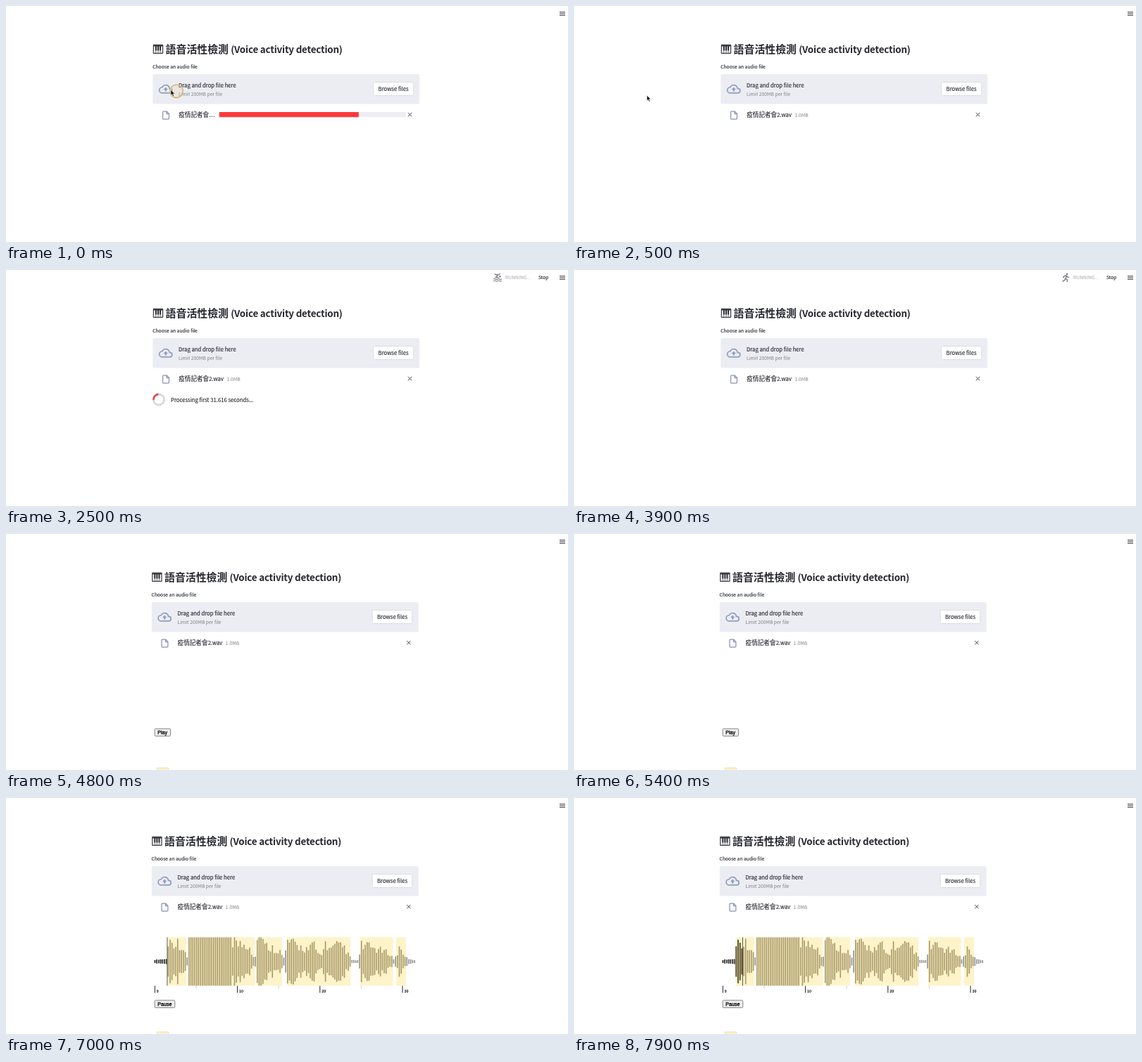
Write an HTML page that moves like this. It is 798 px wide and 336 px high and loops after 8000 ms.

```html
<!DOCTYPE html>
<html lang="zh-Hant">
<head>
<meta charset="utf-8">
<title>Voice activity detection</title>
<style>
  html, body { margin: 0; width: 100%; height: 100%; overflow: hidden; background: #fff; }
  svg { display: block; width: 100%; height: 100%; }
  text { font: 7.71px 'Noto Sans CJK TC', 'Noto Sans CJK SC', 'Noto Sans CJK JP', 'Noto Sans CJK', sans-serif; fill: #262730; stroke: #262730; stroke-width: .13; white-space: pre; }
  text.small { font-size: 6.75px; }
  text.dim { fill: #7f8089; stroke: none; }
  text.han { font-size: 8.6px; }
  text.title { font-size: 13.4px; font-weight: 700; letter-spacing: -.2px; stroke: none; }
  text.title.han { font-size: 14.9px; letter-spacing: 0; }
  text.button { font: 7.2px 'Liberation Sans', Arial, sans-serif; fill: #000; stroke: #000; stroke-width: .28; }
  text.tick { font: bold 5.4px 'Liberation Sans', Arial, sans-serif; fill: #111; stroke: none; }
  .line { fill: none; stroke-linecap: round; stroke-linejoin: round; }
</style>
</head>
<body>
<svg viewBox="0 0 798 336">
  <defs>
    <clipPath id="playedClip"><rect id="played" x="205" y="190" width="0" height="85"/></clipPath>
  </defs>

  <path d="M786 8.7h8M786 11h8M786 13.3h8" stroke="#3c3d46" stroke-width="1"/>

  <g id="status">
    <g id="figure" class="line" stroke="#80828a" stroke-width="1.5"></g>
    <text class="small" x="709" y="13.3" style="fill:#a2a3ab;stroke:none">RUNNING...</text>
    <text class="small" x="756" y="13.3">Stop</text>
  </g>

  <g id="page">
    <rect x="208.8" y="54.8" width="14.4" height="13.2" rx="1" fill="#3b3c42"/>
    <path d="M210 57.5h2.6v9.3h-2.6zM213.2 57.5h2.5v9.3h-2.5zM216.3 57.5h2.5v9.3h-2.5zM219.4 57.5h2.6v9.3h-2.6z" fill="#f4f4f6"/>
    <path d="M212.9 57v6.6M216 57v6.6M219.1 57v6.6" stroke="#26272c" stroke-width="1.9"/>
    <text class="title han" x="226.6" y="67.4">語音活性檢測</text>
    <text class="title" x="319.2" y="67">(Voice activity detection)</text>
    <text class="small" x="208.2" y="88.5">Choose an audio file</text>

    <rect x="208.4" y="97" width="378.8" height="42.4" rx="2" fill="#ecedf3"/>
    <g transform="translate(217.1 108.5) scale(.81)" fill="#8e9dbe">
      <path fill-rule="evenodd" d="M19.4 10a7.5 7.5 0 0 0 -14 -2a6 6 0 0 0 .6 12h13a5 5 0 0 0 .4 -10zM19 18h-13a4 4 0 0 1 -.4 -8l1 -.1l.5 -.9a5.5 5.5 0 0 1 10.3 1.4l.3 1.5l1.5 .1a3 3 0 0 1 -.2 6z"/>
      <path d="M8 13h2.5v3h3v-3h2.5l-4 -4z"/>
    </g>
    <text x="245" y="115.5">Drag and drop file here</text>
    <text class="small dim" x="245.1" y="128.4">Limit 200MB per file</text>
    <rect x="521.8" y="108.5" width="56.6" height="19" rx="2" fill="#fff" stroke="#d6d7de" stroke-width=".8"/>
    <text x="528.6" y="120.7">Browse files</text>

    <path class="line" d="M223.7 150h4.4l3.4 3.4v6.6q0 1.1 -1.1 1.1h-6.7q-1.1 0 -1.1 -1.1v-8.9q0 -1.1 1.1 -1.1zM228 150.3v3.2h3.2" stroke="#8c90b8" stroke-width="1.25"/>
    <text class="han" x="245.2" y="158.2">疫情記者會</text>
    <path d="M570.7 152l5.4 5.4M576.1 152l-5.4 5.4" stroke="#31333f" stroke-width=".9"/>
    <g id="uploading">
      <text x="288.4" y="158" style="letter-spacing:.8px">...</text>
      <rect x="302.8" y="151" width="265.2" height="7.2" fill="#ededf3"/>
      <rect id="progress" x="302.8" y="151" height="7.2" fill="#fd393c"/>
    </g>
    <g id="uploaded">
      <text x="288.3" y="158">2.wav</text>
      <text class="small dim" x="313.4" y="158">1.0MB</text>
    </g>
    <g id="busy">
      <g class="line" stroke-width="2.7">
        <circle cx="217" cy="184.5" r="7.6" stroke="#d6d7da"/>
        <path id="arc" d="M211.63 179.13a7.6 7.6 0 0 1 10.74 0" stroke="#e5484e" stroke-linecap="butt"/>
      </g>
      <text x="234" y="187.7">Processing first 31.616 seconds...</text>
    </g>
  </g>

  <g id="player">
    <g id="wave">
      <g id="regions" fill="#fff3ca"></g>
      <g id="bars"></g>
      <g id="barsPlayed" clip-path="url(#playedClip)"></g>
      <path id="head" d="M0 198.3v69" stroke="#444" stroke-width=".9"/>
      <g id="ruler"></g>
    </g>
    <g id="button">
      <rect id="buttonBox" x="211.2" y="277.2" height="10.6" rx="1.5" fill="#efefef" stroke="#666" stroke-width=".8"/>
      <text id="buttonText" class="button" x="215.2" y="285.1"></text>
    </g>
    <rect x="214.4" y="333" width="16" height="8" fill="#fff3ca" stroke="#ddd3a6" stroke-width=".7"/>
  </g>

  <g id="pointer">
    <g id="ring">
      <circle r="9.2" fill="#e6c88c" fill-opacity=".2" stroke="#d8bb86" stroke-width="1.8"/>
    </g>
    <path id="cursor" d="M0 0v7.6l1.8 -1.6l1.3 2.9l1.3 -.6l-1.3 -2.8h2.5z" fill="#111" stroke="#fff" stroke-width=".5"/>
  </g>
</svg>
<script>
const LOOP = 8000, STEP = 100;
const START = 211.5, PITCH = 2.69, MID = 232.8, PX_PER_SEC = 11.72;
const $ = id => document.getElementById(id);
const show = (id, on) => $(id).setAttribute('display', on ? 'inline' : 'none');
const move = (id, x, y) => $(id).setAttribute('transform', `translate(${x} ${y})`);
const clamp = v => Math.max(0, Math.min(1, v));

const speech = [[229.6, 255.8], [259, 353.2], [356.4, 392], [398.6, 489.2], [503, 549.6], [553.8, 568]];
// Loudness envelope: x, half height
const envelope = [
  [211, 2.5], [228, 3.5], [230, 37], [244, 35], [248, 30], [252, 22], [256, 9],
  [258, 4], [260, 42], [324, 42], [327, 33], [347, 30], [350, 8], [353, 13], [355, 7], [357, 42],
  [363, 40], [367, 30], [390, 20], [393, 4], [396, 7], [399, 38], [415, 28], [431, 22], [436, 34],
  [441, 18], [448, 10], [451, 34], [462, 22], [468, 30], [481, 26], [488, 8], [491, 2], [501, 2],
  [504, 30], [520, 26], [545, 15], [549, 4], [552, 3], [554, 12], [559, 26], [566, 12], [570, 4], [582, 1.5]
];

function loudness(x) {
  const i = Math.max(1, envelope.findIndex(p => p[0] >= x));
  const [x0, a] = envelope[i - 1], [x1, b] = envelope[i];
  return a + (b - a) * (x - x0) / (x1 - x0);
}

function buildWave() {
  $('regions').innerHTML = speech.map(([a, b]) =>
    `<rect x="${a}" y="198.3" width="${b - a}" height="69"/>`).join('');
  const bar = (x, h, color) =>
    `<rect x="${x - .8}" y="${MID - h}" width="1.6" height="${2 * h}" rx=".5" fill="${color}"/>`;
  let bars = '', played = '';
  for (let i = 0; i < 138; i++) {
    const x = START + i * PITCH, base = loudness(x);
    const noise = Math.abs(Math.sin(i * 12.9898) * 43758.5453) % 1;
    const gain = base > 40 ? (noise < .12 ? .48 : 1) : base < 8 ? .85 + .3 * noise : .5 + .52 * noise;
    const h = Math.min(34.5, base * gain);
    const voiced = speech.some(([a, b]) => x >= a && x <= b);
    bars += bar(x, h, voiced ? '#a59765' : '#8f8f92');
    played += bar(x, h, voiced ? '#4d4424' : '#333');
  }
  $('bars').innerHTML = bars;
  $('barsPlayed').innerHTML = played;

  let ruler = '';
  for (let s = 0; s <= 30; s += 5) {
    const x = 211.4 + s * PX_PER_SEC;
    ruler += s % 10
      ? `<path d="M${x} 267.4v4" stroke="#bbb" stroke-width=".8"/>`
      : `<path d="M${x} 267.4v10" stroke="#222" stroke-width="1"/><text class="tick" x="${x + 2.4}" y="277.3">${s}</text>`;
  }
  $('ruler').innerHTML = ruler;
}

const ball = (x, y, r = 1.3) => `<circle cx="${x}" cy="${y}" r="${r}" fill="#80828a" stroke="none"/>`;
const limbs = d => `<path d="${d}"/>`;
const figures = [
  // swimmer
  ball(701.4, 9.2) + limbs('M694 6l4.4 1l-3 3.4M698.4 7l3 -1.4M695 10.4l4 .2') +
    '<path stroke-width="1.1" d="M692.6 13q1.4 -1.2 2.8 0t2.8 0t2.8 0t2.6 0M692.6 15.6q1.4 -1.2 2.8 0t2.8 0t2.8 0t2.6 0"/>',
  // runner
  ball(700, 5.9) + limbs('M699.2 8l-1.4 4l2.6 1.6l-.2 3M697.8 12l-1.2 2.6l-2.6 1.4M694.8 10.8l1.2 -2.4l3.2 -.4l1.4 2l2 .2'),
  // jumper
  ball(698.4, 5.6) + limbs('M694 6.6l2.6 2.2h3.6l2.2 -2.6M698.4 9v3.4l-3 1.4v2.6M698.4 12.4l3 1.2l.6 2.8'),
  // rower
  ball(697.6, 6.8) + limbs('M697 9l-1 4h4l2.2 -1.6M697.2 9.6l4 1.4M693.2 15.8h9.4'),
  // cyclist
  ball(700, 5.7) + limbs('M698.8 7.8l-2.6 2.8l2 1.6v2.6M698.8 8l1.8 2.2h2') +
    '<g stroke-width="1.1"><circle cx="693.8" cy="14" r="2.5"/><circle cx="701.8" cy="14" r="2.5"/></g>',
  // lifter
  ball(698, 8) + limbs('M693 5.4h10M695 5.6l1.4 4h3.2l1.4 -4M698 10v2.6l-2.4 4M698 12.6l2.4 4')
];
let shown = -1;

function render(time) {
  const t = Math.floor(time / STEP) * STEP;

  // Pointer leaves to the left
  const away = 252 * Math.pow(clamp(t / 800), 1.4);
  show('pointer', t < 900);
  move('cursor', 234 - away, 119.5 + away * .06);
  move('ring', 242 - away, 121.3 + away * .06);
  $('ring').setAttribute('opacity', clamp(1 - t / 400));

  show('uploading', t < 400);
  show('uploaded', t >= 400);
  $('progress').setAttribute('width', 198 + 67.2 * clamp(t / 300));

  show('busy', t >= 700 && t < 3600);
  $('arc').setAttribute('transform', `rotate(${240 + (t - 1300) * .36} 217 184.5)`);

  show('status', t >= 600 && t < 4800);
  const pose = Math.floor((t + 1100) / 200) % figures.length;
  if (pose !== shown) $('figure').innerHTML = figures[shown = pose];

  // Scrollbar shifts the layout once the player is inserted
  move('page', t >= 4700 ? -1.6 : 0, 0);
  show('player', t >= 4800);
  const playing = t >= 5500;
  show('wave', playing);
  move('button', 0, playing ? 10.8 : 0);
  $('buttonBox').setAttribute('width', playing ? 28.6 : 22.4);
  $('buttonText').textContent = playing ? 'Pause' : 'Play';
  const x = 218.4 + (t - 6100) / 1000 * PX_PER_SEC;
  move('head', x, 0);
  $('played').setAttribute('width', Math.max(0, x - 205));
}

buildWave();
const origin = performance.now();
function tick() {
  render((performance.now() - origin) % LOOP);
  requestAnimationFrame(tick);
}
tick();
</script>
</body>
</html>
```
